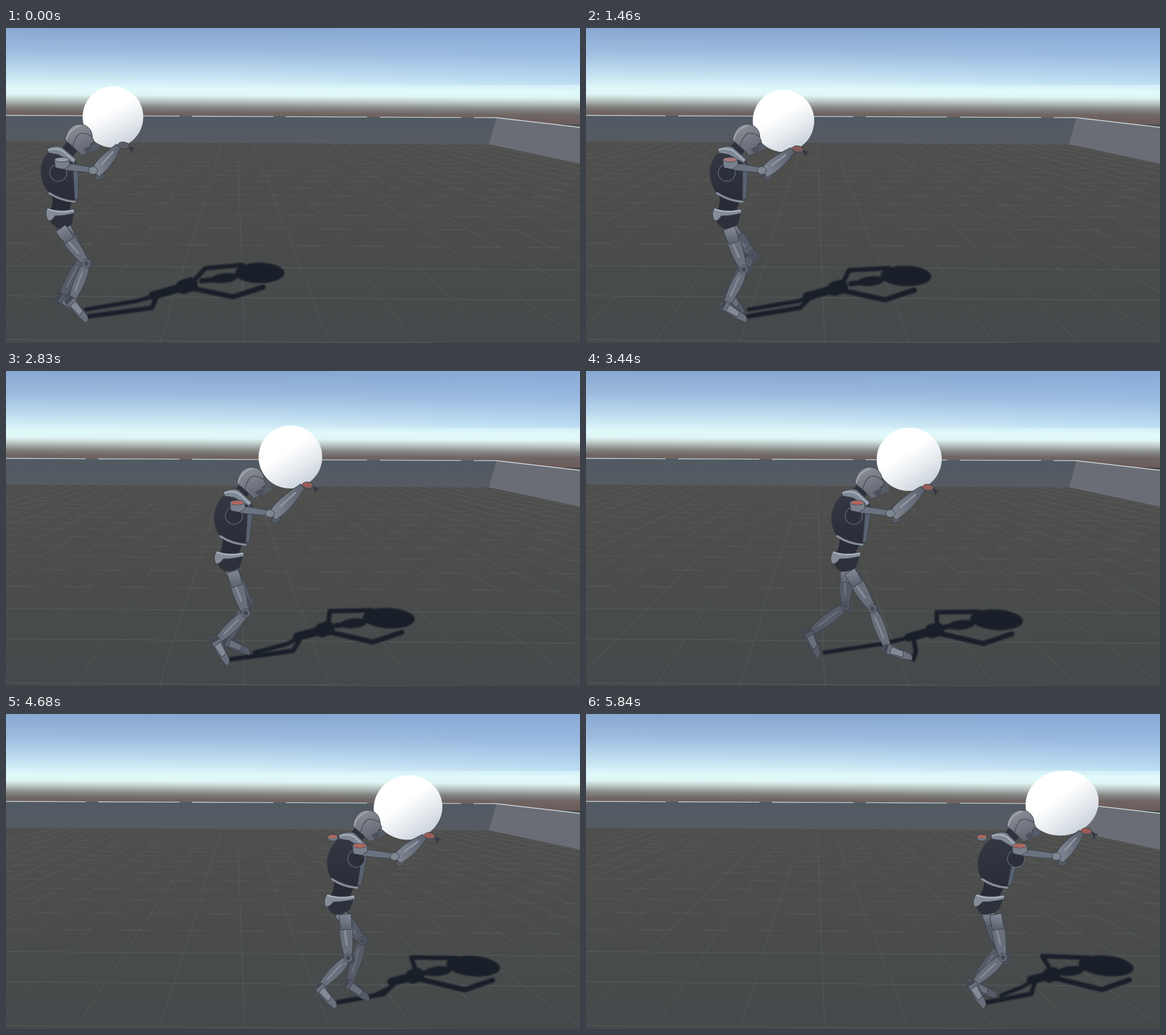
Animation of 1009x555 px, one loop 5.93 s. Source, as an HTML page:

```html
<!DOCTYPE html>
<html lang="en">
<head>
<meta charset="utf-8">
<title>Robot carrying a ball</title>
<style>
html, body { margin: 0; width: 100%; height: 100%; overflow: hidden; background: #494b4b; }
svg { display: block; width: 100%; height: 100%; }
</style>
</head>
<body>
<svg viewBox="0 0 1009 555" preserveAspectRatio="none">
  <defs>
    <linearGradient id="sky" gradientUnits="userSpaceOnUse" x1="0" y1="0" x2="-1" y2="160">
      <stop offset="0" stop-color="#88a8d1"/>
      <stop offset=".25" stop-color="#9dbbde"/>
      <stop offset=".48" stop-color="#bfdcef"/>
      <stop offset=".66" stop-color="#dff9fb"/>
      <stop offset=".73" stop-color="#dff5f3"/>
      <stop offset=".79" stop-color="#bac6c4"/>
      <stop offset=".86" stop-color="#858785"/>
      <stop offset=".92" stop-color="#6f6664"/>
      <stop offset="1" stop-color="#6b5d5b"/>
    </linearGradient>
    <linearGradient id="blue">
      <stop offset=".4" stop-color="#8bb5ea" stop-opacity="0"/>
      <stop offset="1" stop-color="#8bb5ea" stop-opacity=".25"/>
    </linearGradient>
    <linearGradient id="wall" x1="0" y1="0" x2="0" y2="1">
      <stop offset="0" stop-color="#515963"/>
      <stop offset="1" stop-color="#565b62"/>
    </linearGradient>
    <linearGradient id="floor" x1="0" y1="0" x2="0" y2="1">
      <stop offset="0" stop-color="#4f4f4d"/>
      <stop offset=".5" stop-color="#4a4c4b"/>
      <stop offset="1" stop-color="#45494b"/>
    </linearGradient>
    <linearGradient id="ball" x1=".25" y1="0" x2=".75" y2="1">
      <stop offset=".4" stop-color="#fff"/>
      <stop offset=".65" stop-color="#e9edf1"/>
      <stop offset="1" stop-color="#c5ced6"/>
    </linearGradient>
    <linearGradient id="metal" x1="0" y1="0" x2="1" y2=".3">
      <stop offset="0" stop-color="#858c98"/>
      <stop offset="1" stop-color="#5f6672"/>
    </linearGradient>
    <linearGradient id="helmet" x1="0" y1="0" x2=".4" y2="1">
      <stop offset="0" stop-color="#90949c"/>
      <stop offset="1" stop-color="#626772"/>
    </linearGradient>
    <linearGradient id="chest" x1="0" y1="0" x2="0" y2="1">
      <stop offset="0" stop-color="#343843"/>
      <stop offset="1" stop-color="#2a2d38"/>
    </linearGradient>
    <filter id="soft" x="-10%" y="-20%" width="120%" height="140%"><feGaussianBlur stdDeviation="1.3"/></filter>
  </defs>
  <rect width="1009" height="170" fill="url(#sky)"/>
  <rect width="1009" height="100" fill="url(#blue)"/>
  <rect y="198" width="1009" height="357" fill="url(#floor)"/>
  <g id="grid" fill="none" stroke="#656a69"></g>
  <path d="M0 154L862 158L849 205L0 200Z" fill="url(#wall)"/>
  <path d="M862 158L1009 175V239L849 205Z" fill="#6a6d76"/>
  <path d="M0 154L862 158" stroke="#c5d1d5" stroke-width="1.3" stroke-dasharray="143 22" stroke-dashoffset="3"/>
  <path d="M862 158L1009 175" stroke="#d3dcdf" stroke-width="1.5"/>
  <g id="scene"></g>
</svg>
<script>
const { PI, sin, cos, min, max, hypot, atan2, floor } = Math;
const LOOP = 5930, END = 5840, CYCLE = 3000, SPEED = .1048;
const scene = document.getElementById('scene');

// Perspective floor
function grid() {
  const vx = 404, vy = 125;
  let out = '';
  for (let i = -12; i <= 16; i++) {
    const x = 419.5 + i * 148.8;
    out += `<path d="M${x} 553L${vx + (x - vx) * .18} 202" opacity=".5"/>`;
  }
  for (let n = 0; n < 16; n++) {
    const y = vy + 1 / (.002358 + .000525 * n);
    const dash = n > 2 ? `stroke-dasharray="${62 - n * 2} ${50 - n}" stroke-dashoffset="${n * 37}"` : '';
    out += `<path d="M0 ${y}L1009 ${y + 8}" opacity="${.6 - n * .02}" ${dash}/>`;
  }
  return out;
}
document.getElementById('grid').innerHTML = grid();

// Markup helpers
const EDGE = 'stroke="#3b404a" stroke-width="1"';
const at = (p, x, y) => [p[0] + x, p[1] + y];
const mix = (a, b, s) => [a[0] + (b[0] - a[0]) * s, a[1] + (b[1] - a[1]) * s];
const path = (d, fill, more = '') => `<path d="${d}" fill="${fill}" ${more}/>`;
const poly = (...ps) => 'M' + ps.map(p => p.map(v => v.toFixed(1)).join(' ')).join('L');
const line = (color, w, ...ps) =>
  path(poly(...ps), 'none', `stroke="${color}" stroke-width="${w}" stroke-linecap="round" stroke-linejoin="round"`);
const oval = (p, rx, ry, fill, more = '', turn = 0) =>
  `<ellipse rx="${rx}" ry="${ry}" fill="${fill}" ${more} transform="translate(${p[0]} ${p[1]}) rotate(${turn})"/>`;
// Draws in a frame whose x axis runs from a to b
function along(a, b, shape) {
  const dx = b[0] - a[0], dy = b[1] - a[1];
  return `<g transform="translate(${a[0]} ${a[1]}) rotate(${atan2(dy, dx) * 180 / PI})">${shape(hypot(dx, dy))}</g>`;
}
const limb = (a, b, w, bulge, end, fill) => along(a, b, n => path(
  `M0 ${-w}C${n * .25} ${-bulge} ${n * .5} ${-bulge} ${n} ${-end}V${end}C${n * .6} ${bulge} ${n * .3} ${bulge} 0 ${w}Z`, fill, EDGE));

// Joint between a and b, bent forward
function bend(a, b, upper, lower) {
  const dx = b[0] - a[0], dy = b[1] - a[1], d = min(hypot(dx, dy), upper + lower - .5);
  const turn = atan2(dy, dx) - Math.acos((upper * upper + d * d - lower * lower) / (2 * upper * d));
  return at(a, upper * cos(turn), upper * sin(turn));
}

// The foot stays planted while the body passes, then swings forward
function stride(hip, footX, phase, reach, ground, upper, lower) {
  const p = ((phase - .75) % 1 + 1) % 1, swing = .45;
  const x = p < swing ? -cos(PI * p / swing) : 1 - 2 * (p - swing) / (1 - swing);
  const pitch = (43 - 35 * sin(2 * PI * (phase - .03))) * PI / 180;
  const ankle = [footX + reach * x, min(ground - 24, ground - 42 * sin(pitch))];
  return { hip, ankle, knee: bend(hip, ankle, upper, lower), toe: at(ankle, 42 * cos(pitch), 42 * sin(pitch)) };
}

function leg({ hip, knee, ankle, toe }, main, lit) {
  const foot = along(ankle, toe, n =>
    path(`M-9 -5Q0 -10 6 -8L${n - 4} -5Q${n + 5} -1 ${n + 3} 5L${n - 14} 8L-8 9Q-13 3 -9 -5Z`, main, EDGE)
    + path(`M4 -6L${n - 16} -5L${n - 14} 5L5 7Z`, lit, EDGE)
    + path('M-9 -5L-2 -7L-1 8L-9 8Z', '#444853'));
  return limb(hip, knee, 9, 13, 6, main)
    + line(lit, 4, mix(at(hip, -3, 4), knee, .15), mix(at(hip, -3, 0), knee, .7))
    + limb(hip, mix(hip, knee, .35), 10, 11, 9, 'url(#metal)')
    + oval(at(knee, 5, 2), 8, 9, '#484d58')
    + limb(mix(knee, ankle, .08), ankle, 7, 11, 5, main)
    + line(lit, 3, mix(at(knee, -2, 0), ankle, .22), mix(at(knee, -2, 0), ankle, .72))
    + oval(ankle, 5, 5, '#50555f') + foot
    + oval(knee, 7.5, 7.5, main, EDGE) + oval(knee, 4.5, 4.5, '#474c57');
}

function torso(x, u) {
  const k = .25 * u;
  return `<g transform="matrix(${1 + .06 * u} 0 ${-k} 1 ${x + 2 + k * 330} 0)">`
    + path('M-16 294L20 304L15 322H-18Q-12 307 -16 294Z', '#292c36')
    + path('M-22 328L23 326L20 345Q10 355 -5 353Q-19 346 -22 328Z', '#2e313b', EDGE)
    + path('M-24 318Q0 325 23 319L25 326Q8 331 -10 331Q-16 342 -22 339Q-28 330 -24 318Z', '#848c98', EDGE)
    + path('M-23 319Q0 327 23 321', 'none', 'stroke="#a9b1bb" stroke-width="2.5"')
    + path('M-21 219C-35 230 -38 255 -32 269Q-28 284 -19 292L25 306L29 238L4 213Z', 'url(#chest)', EDGE)
    + path('M21 235L31 242L31 300L25 304Z', '#596271', EDGE)
    + path('M-20 291Q2 305 25 306', 'none', 'stroke="#858e9b" stroke-width="3.5" stroke-linecap="round"')
    + path('M-24 213Q-10 206 2 210L27 231L23 238L-4 223L-21 220Z', '#7f8895', EDGE)
    + path('M-22 215Q-8 210 4 217L24 234', 'none', 'stroke="#aab3bd" stroke-width="2.2"') + '</g>';
}

function head(p) {
  return line('#2f323c', 24, at(p, -8, 8), at(p, -17, 20))
    + `<g transform="translate(${p[0]} ${p[1]})">`
    + path('M-22 0C-21 -19 -6 -32 9 -28C20 -25 26 -16 26 -5L29 2L22 7L23 17L17 23L7 27Q-2 15 -22 0Z', 'url(#helmet)', EDGE)
    + path('M-9 12Q-5 -6 4 -12Q14 -15 26 -6', 'none', 'stroke="#4c505b" stroke-width="1.6"')
    + path('M-20 -1Q-15 -20 4 -26', 'none', 'stroke="#a6aab1" stroke-width="2"')
    + path('M10 15L20 10L24 17L17 24Z', '#4c515d') + '</g>';
}

function shadow(s, u, near, far) {
  const c = '#191d27', hip = at(s, -180 + 56 * u, 39 - 15 * u);
  const neck = at(s, -102 + 20 * u, 14 - 2 * u), chest = mix(hip, neck, .75);
  const low = at(s, -47 + 40 * u, 42), high = at(s, -96 - 16 * u, -8 - 9 * u);
  return '<g filter="url(#soft)" opacity=".92">'
    + line(c, 8, hip, [near.knee[0] + 115 - 65 * u, 493], [near.toe[0] + 4, 508])
    + line(c, 7, hip, [far.knee[0] + 95 - 55 * u, 481], [far.toe[0] + 10, 496])
    + line(c, 15, at(hip, -8, 1), mix(hip, neck, .5))
    + line(c, 25, mix(hip, neck, .58), chest)
    + line(c, 8, chest, high, at(s, -30, -14))
    + line(c, 9, at(chest, 0, 6), low, at(s, 6 + 35 * u, 25))
    + line(c, 9, neck, at(s, -62, 10))
    + oval(at(s, -62, 9), 24, 8.5, c, '', -6)
    + oval(s, 43.5 + 5 * u, 18, c, '', 6 * u) + '</g>';
}

function arm(shoulder, elbow, wrist, warm) {
  const cap = poly(at(shoulder, -13, -8), at(shoulder, 13, -8), at(shoulder, 14, 2), at(shoulder, 4, 9), at(shoulder, -11, 6));
  return oval(at(shoulder, -6, 15), 15, 15, '#2c303a', 'stroke="#646c79" stroke-width="1.3"')
    + limb(at(shoulder, 6, 4), elbow, 6, 6, 4, '#6b7380')
    + path(cap + 'Z', '#78808c', EDGE)
    + oval(at(shoulder, 0, -8), 12.5, 4, '#969da6', EDGE)
    + oval(at(shoulder, 0, -8), 11, 3.5, '#b0655d', `opacity="${warm}"`)
    + oval(at(elbow, 6, 10), 9, 6, '#565b66', EDGE, -35)
    + limb(at(elbow, -1, 5), wrist, 9, 13, 5, 'url(#metal)')
    + line('#8f97a3', 3, mix(elbow, wrist, .25), mix(elbow, wrist, .75))
    + oval(at(elbow, -5, 0), 8, 7, '#7e8692', EDGE)
    + line('#353843', 3.5, at(wrist, 8, -1), at(wrist, 20, 2), at(wrist, 23, 10))
    + line('#353843', 3, at(wrist, 12, 0), at(wrist, 27, 5))
    + oval(at(wrist, 9, -1), 10, 6, '#5d5b61', EDGE, 8)
    + oval(at(wrist, 8, -2), 9, 4.5, '#a95b52', `opacity="${warm * .8}"`, 8);
}

function draw(t) {
  const u = t / END, turn = u * u, phase = t / CYCLE, x = 94 + SPEED * t;
  const warm = min(1, max(0, (t - 700) / 1200));
  const near = stride([x + 2 + 12 * u, 353], x + 6 - 15 * u, phase, 86, 514, 77, 72);
  const far = stride([x + 8 - 8 * u, 350], x + 10 - 42 * u, phase + .5, 76, 501, 64, 80);
  const ball = [x + 94 + 37 * u ** 1.2, 157 + 5 * u - 9 * cos(2 * PI * (t - 600) / 2430)];
  const skull = [x + 32 + 24 * turn, 198];
  const shoulder = [x + 4 + 52 * turn, 240], elbow = [x + 64 + 62 * turn, 251];
  const wrist = at(ball, 10 + 24 * u, 51);
  const spot = [446 + SPEED * t * .765, 432 + 12 * u + .35 * (ball[1] - 158)];
  const farCap = [x - 10, 218];
  scene.innerHTML = shadow(spot, u, near, far)
    + leg(far, '#555c68', '#69707c')
    + line('#555c69', 10, at(skull, 10, 20), at(skull, 33, 10))
    + oval(ball, 53.3 + 11.2 * turn, 54 + 3 * u, 'url(#ball)', '', -12 * u)
    + (u > .6 ? oval(farCap, 9, 6, '#6d7581', EDGE) + oval(at(farCap, 0, -2), 8, 3, '#b0655d') : '')
    + head(skull) + torso(x, u)
    + leg(near, '#69707c', '#848b97')
    + arm(shoulder, elbow, wrist, warm);
}

// Motion advances in short steps, with one longer pause
function stepped(t) {
  const step = 76.45, resume = 4370, late = 77.3;
  return t < resume
    ? min(54, floor(t / step)) * step
    : resume + min(19, floor((t - resume) / late)) * late;
}
const start = performance.now();
let shown = -1;
function tick() {
  const t = stepped((performance.now() - start) % LOOP);
  if (t !== shown) draw(shown = t);
  requestAnimationFrame(tick);
}
tick();
</script>
</body>
</html>
```
